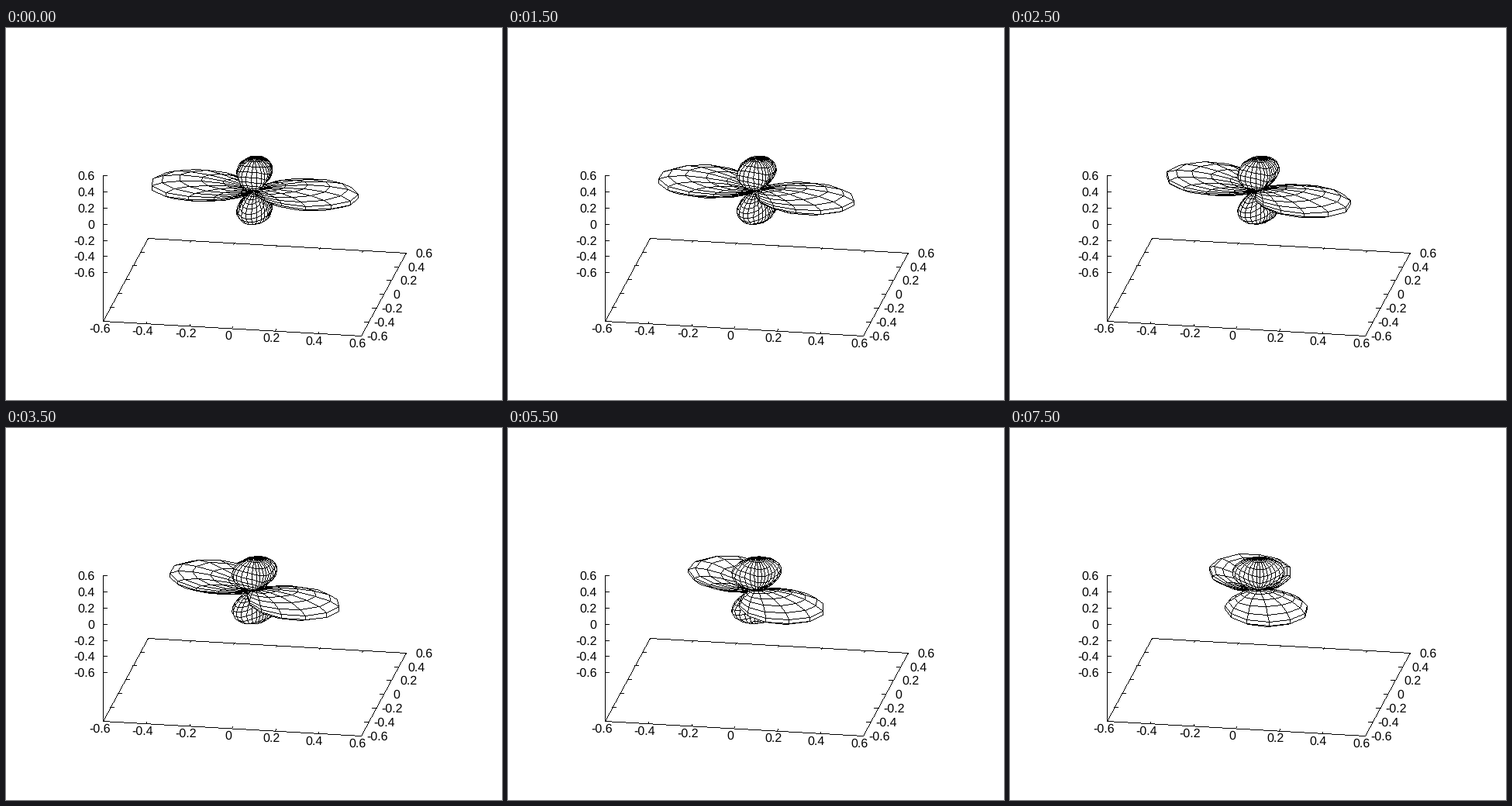
A matplotlib script that plays this animation: 640 by 480 pixels, repeating every 8000 ms.

```python
import numpy as np
import matplotlib.pyplot as plt
from matplotlib.animation import FuncAnimation

W, H, DPI = 640, 480, 100
FRAMES, INTERVAL = 16, 500
SAMPLES = 30
LIM, FLOOR, TICK = 0.6, -1.2, 0.018
BLACK, WHITE = 0, 255

# Screen position of the origin and of one unit along x, y, z
ORIGIN = np.array([320.7, 209.2])
AXES = np.array([[277.4, 15.8], [48.2, -89.2], [0, -104.2]])
TO_VIEWER = np.array([0.1736, -1.0, 0.882])

theta, phi = np.meshgrid(np.linspace(0, np.pi, SAMPLES),
                         np.linspace(0, 2 * np.pi, SAMPLES), indexing="ij")
Y20 = np.sqrt(5 / (16 * np.pi)) * (3 * np.cos(theta) ** 2 - 1)
Y22 = np.sqrt(15 / (32 * np.pi)) * np.sin(theta) ** 2


def project(points):
    """Pixel column and row of points in space."""
    return np.floor(ORIGIN + np.asarray(points) @ AXES).astype(int)


def draw_line(img, p, q):
    """One pixel wide line without smoothing, the same in both directions."""
    (x0, y0), (x1, y1) = sorted([tuple(p), tuple(q)])
    n = max(abs(x1 - x0), abs(y1 - y0), 1)
    s = np.arange(n + 1) / n
    img[np.floor(y0 + s * (y1 - y0) + 0.5).astype(int),
        np.floor(x0 + s * (x1 - x0) + 0.5).astype(int)] = BLACK


def clear_triangle(img, a, b, c):
    x0, y0 = np.minimum(np.minimum(a, b), c)
    x1, y1 = np.maximum(np.maximum(a, b), c) + 1
    x, y = np.arange(x0, x1), np.arange(y0, y1)[:, None]
    s1, s2, s3 = [(q[0] - p[0]) * (y - p[1]) - (q[1] - p[1]) * (x - p[0])
                  for p, q in ((a, b), (b, c), (c, a))]
    inside = ((s1 >= 0) & (s2 >= 0) & (s3 >= 0)) | ((s1 <= 0) & (s2 <= 0) & (s3 <= 0))
    img[y0:y1, x0:x1][inside] = WHITE


def draw_cell(img, a, b, c, d):
    clear_triangle(img, a, b, c)
    clear_triangle(img, a, c, d)
    for p, q in ((a, b), (b, c), (c, d), (d, a)):
        draw_line(img, p, q)


def surface(turn):
    """Squared modulus of Y20 + Y22 with the pattern turned about z."""
    r = Y20**2 + Y22**2 - 2 * Y20 * Y22 * np.cos(2 * (phi + turn))
    return np.stack([r * np.sin(theta) * np.cos(phi),
                     r * np.sin(theta) * np.sin(phi),
                     r * np.cos(theta)], axis=-1)


def cells(grid):
    """Corners of every mesh cell, farthest cell first."""
    quads = np.stack([grid[:-1, :-1], grid[1:, :-1], grid[1:, 1:], grid[:-1, 1:]],
                     axis=2).reshape(-1, 4, 3)
    return quads[np.argsort(quads.mean(axis=1) @ TO_VIEWER)]


plt.rcParams["text.hinting"] = "none"
fig = plt.figure(figsize=(W / DPI, H / DPI), dpi=DPI, facecolor="white")
ax = fig.add_axes([0, 0, 1, 1])
ax.axis("off")


def label(x, y, value, align):
    ax.text(x, y + 5.5, f"{value:g}", ha=align, va="baseline",
            family="Liberation Sans", size=16 * 72 / DPI, color="black")


def draw_axes(img):
    corners = project([(sx * LIM, sy * LIM, FLOOR)
                       for sx, sy in [(-1, -1), (1, -1), (1, 1), (-1, 1), (-1, -1)]])
    for p, q in zip(corners, corners[1:]):
        draw_line(img, p, q)
    draw_line(img, *project([(-LIM, -LIM, FLOOR), (-LIM, -LIM, LIM)]))

    step_x, step_y = np.round(TICK * AXES[:2]).astype(int)
    for i in range(-3, 4):
        v = i / 5
        front, back, left, right, rise = project(
            [(v, -LIM, FLOOR), (v, LIM, FLOOR), (-LIM, v, FLOOR), (LIM, v, FLOOR),
             (-LIM, -LIM, v)])
        for start, step in ((front, step_y), (back, -step_y), (left, step_x),
                            (right, -step_x), (rise, step_x)):
            draw_line(img, start, start + step)
        label(front[0] - 4, front[1] + 9, v, "center")
        label(right[0] + (7 if v < 0 else 12.5), right[1] + 0.5, v, "left")
        label(114.5, rise[1], v, "right")


backdrop = np.full((H, W), WHITE, dtype=np.uint8)
draw_axes(backdrop)
stage = ax.imshow(backdrop, cmap="gray", vmin=BLACK, vmax=WHITE, aspect="auto",
                  extent=(0, W, H, 0), interpolation="nearest")


def update(n):
    img = backdrop.copy()
    for quad in project(cells(surface(np.radians(4.5 * (n + 1))))):
        draw_cell(img, *quad)
    stage.set_data(img)
    return [stage]


anim = FuncAnimation(fig, update, frames=FRAMES, interval=INTERVAL,
                     repeat=True, repeat_delay=0, blit=False)
plt.show()
```
